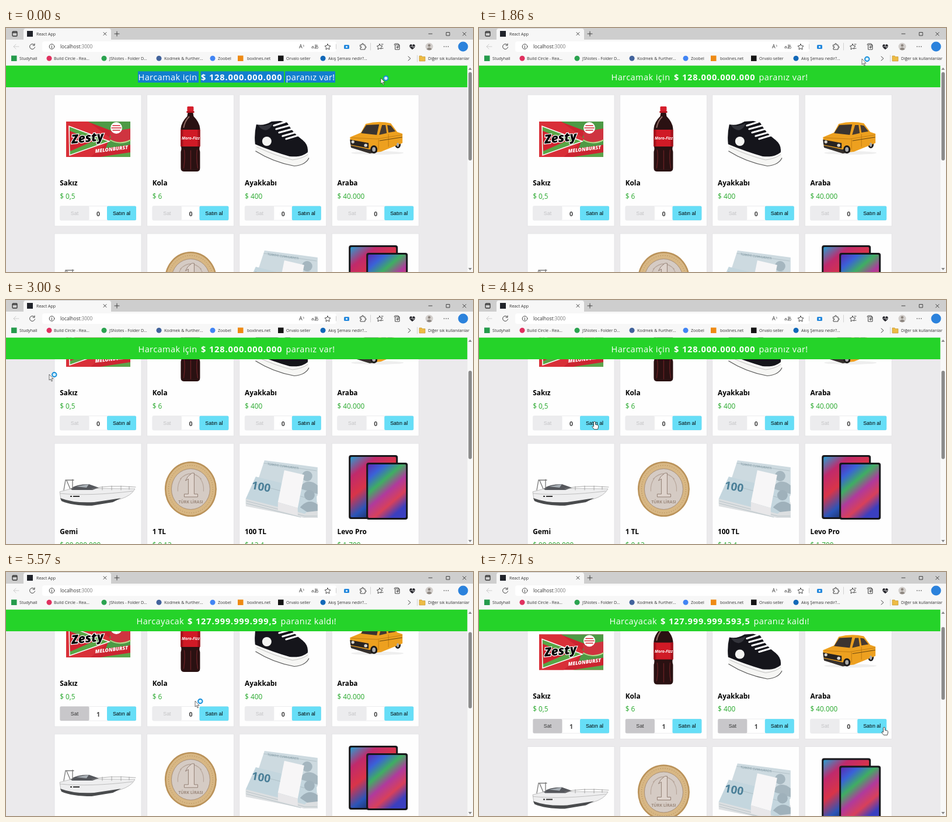
These frames come from a looping animation (800 px wide and 420 px high, 8000 ms). An HTML page:

```html
<!DOCTYPE html>
<html lang="tr">
<head>
<meta charset="utf-8">
<title>React App</title>
<style>
html, body { margin: 0; width: 100%; height: 100%; overflow: hidden; background: #ebeaec }
svg { display: block; font-family: "Open Sans", "Noto Sans", sans-serif }
.btn { font: 8.9px "Liberation Sans", Arial, sans-serif; text-anchor: middle }
.name { font-size: 11.8px; font-weight: 700 }
.price { font-size: 11.8px; fill: #27a82c }
.count { font-size: 10.5px; font-weight: 700; fill: #444; text-anchor: middle }
.head { font-size: 14.5px; fill: #fff; letter-spacing: .43px }
.sum { font-weight: 700; letter-spacing: .92px }
.small { font-size: 7.1px; fill: #333 }
.icon { fill: none; stroke: #333; stroke-width: .9; stroke-linejoin: round; stroke-linecap: round }
</style>
</head>
<body>
<svg id="stage" width="800" height="420" viewBox="0 0 800 420"></svg>
<script>
const rect = (x, y, w, h, fill, more = '') => `<rect x="${x}" y="${y}" width="${w}" height="${h}" fill="${fill}" ${more}/>`;
const path = (d, fill = 'none', more = '') => `<path d="${d}" fill="${fill}" ${more}/>`;
const oval = (x, y, rx, ry, fill, more = '') => `<ellipse cx="${x}" cy="${y}" rx="${rx}" ry="${ry}" fill="${fill}" ${more}/>`;
const dot = (x, y, r, fill, more) => oval(x, y, r, r, fill, more);
const text = (x, y, s, cls = '', more = '') => `<text x="${x}" y="${y}" class="${cls}" ${more}>${s}</text>`;
const line = (d, color, w = 1) => path(d, 'none', `stroke="${color}" stroke-width="${w}" stroke-linecap="round"`);
const blend = (id, ...colors) => `<linearGradient id="${id}" x2=".6" y2="1">`
  + colors.map((c, i) => `<stop offset="${i / (colors.length - 1)}" stop-color="${c}"/>`).join('') + '</linearGradient>';

// product pictures, in card coordinates
const gum = rect(20, 46, 110, 61, '#cc2430')
  + path('M56 46H130V86L88 92L98 62Z', '#4d9a45') + path('M20 46H58L98 76L62 107H20Z', '#d92f38')
  + path('M95 64L130 58V78Q112 86 97 77Z', '#cf3440') + line('M96 78Q112 87 130 78', '#b8d98c', 2)
  + path('M25 54L94 80L26 104Z', '#58a646', 'stroke="#fff" stroke-width="1.5"')
  + path('M26 62L68 79L27 97Z', '#d3222f')
  + dot(106, 57, 10, '#fff') + line('M100 53H112M98 57H114M100 61H112', '#d3222f', 1.6)
  + text(30, 84, 'Zesty', '', 'font-size="21" font-weight="800" font-style="italic" stroke="#fff" stroke-width="2.4" paint-order="stroke" transform="rotate(-6 30 84)"')
  + text(70, 100, 'MELONBURST', '', 'font-size="8.6" font-weight="800" font-style="italic" fill="#fff" transform="rotate(-7 70 100)"')
  + path('M78 107L130 99V107Z', '#5da44b');

const cola = rect(69, 20, 11, 8, '#d51f2b', 'rx="1.5"') + rect(68, 28, 13, 3, '#b5141f')
  + path('M70 31H79L80 37Q90 47 91 58V88Q89 92 91 98V126Q91 132 85 132H64Q58 132 58 126V98Q60 92 58 88V58Q59 47 69 37Z', '#2a1112')
  + line('M63 56Q65 45 72 38', '#8f6a64', 2) + rect(58, 60, 33, 29, '#d01a26')
  + rect(58, 60, 4, 29, '#a5111b') + rect(87, 60, 4, 29, '#a5111b')
  + text(75, 77, 'Moro-Fizz', '', 'font-size="6.8" font-weight="700" font-style="italic" fill="#fff" text-anchor="middle"')
  + line('M64 95Q66 108 63 126M75 96V128M86 95Q84 108 87 126', '#642024', 1.4);

const shoe = path('M27 84Q58 99 85 107Q106 106 118 98L119 109Q113 122 94 123Q58 116 28 97Z', '#f6f6f4')
  + line('M28 97Q58 116 94 122.500Q113 121 119 109', '#555', 1.2)
  + path('M29 51Q42 54 55 46L70 45L82 48Q91 65 106 76Q119 85 117 99Q106 108 86 106Q58 98 27 85Q25 68 29 51Z', '#15151b')
  + path('M32 52Q42 56 57 49Q54 59 45 61Q36 60 32 52Z', '#33343b') + dot(47, 80, 8, '#f4f4f2')
  + line('M59 53L78 47M63 59L85 53M68 65L90 59M74 71L95 65M80 76L100 70', '#fff', 3)
  + line('M30 90Q62 105 91 112Q108 110 117 103', '#aaa', .7);

const car = oval(78, 100, 45, 3, '#eee') + oval(113, 85, 5, 7, '#1c1a1a')
  + path('M31 73L50 65L58 50Q80 44 101 49L112 64L121 67L121 83L84 98L64 100L33 90Z', '#eda01f')
  + path('M50 66L59 52L81 51L77 69Z', '#3b3430') + path('M81 69L86 52H92L94 66ZM97 65L95 52L101 53L109 63Z', '#463a31')
  + path('M31 77L63 83L63 92L32 86Z', '#282321') + path('M32 87L64 94L78 93L77 99L65 101L33 91Z', '#35302d')
  + dot(36, 81, 2.6, '#d9d6ce') + dot(58, 87, 2.8, '#d9d6ce')
  + oval(72, 94, 6, 7, '#1c1a1a') + oval(72, 94, 3, 4, '#aaa') + oval(113, 86, 2, 3.5, '#aaa')
  + line('M34 74L77 76L120 69M80 77V94M97 68V89', '#b87410', .8) + line('M82 79L120 73', '#6b4810', 1.2);

const boat = path('M9 83L32 77L138 78Q132 90 112 96L65 104Q30 105 11 96Z', '#eeeeef', 'stroke="#999" stroke-width=".6"')
  + path('M10 94Q34 103 68 101L114 94L100 101L64 107Q30 107 12 99Z', '#494b4d')
  + path('M28 78Q36 70 59 70L76 76L65 80H30Z', '#55575c') + path('M37 74L59 70L55 76Z', '#a7aeb4')
  + line('M16 80L19 63H33M21 64L27 78M31 62V78', '#777', 1.3)
  + line('M64 78Q90 71 139 75M82 74V80M98 73V80M114 73V80M128 74V79', '#888', .7)
  + line('M10 86Q60 91 134 82', '#aaa', .7) + path('M27 90H30V92H27ZM32 90H43V92H32Z', '#333');

const coin = oval(75, 78.5, 44.5, 47.5, '#ba9259') + oval(75, 78.5, 42, 45, '#d8b784')
  + oval(75, 78.5, 38, 41, 'none', 'stroke="#a27d47" stroke-dasharray="1 3"') + oval(75, 78.5, 33, 35, '#d5cbc4', 'stroke="#a99078"')
  + line('M57 61Q75 43 93 61M53 82Q52 69 59 60M97 82Q98 69 91 60', '#b7a69b', 1.2)
  + path('M70 57L77 51H81V87H87V92H64V87H71V61L66 64Z', '#ded3cc', 'stroke="#8c786d" stroke-width=".9"')
  + text(75, 103, 'TÜRK LİRASI', '', 'font-size="7" font-weight="700" fill="#9b887b" text-anchor="middle"');

const cash = path('M43 29L134 41V89L122 105L27 78Z', '#cddae0') + path('M27 66L122 91V105L27 80Z', '#b4c1c8')
  + path('M11 95L28 57L132 83L134 128H112L11 104Z', '#c4d6de') + path('M11 95L112 121L134 101V128H112L11 108Z', '#dcdfe1')
  + line('M12 99L112 125H133M12 103L105 127M28 70L120 95M42 34L132 47', '#9fb0b8', .6)
  + dot(116, 56, 9, '#a5b6bf') + path('M102 77Q116 57 134 72V87Z', '#a5b6bf')
  + dot(120, 89, 9, '#9fb1bb') + path('M104 110Q118 93 134 105V116L116 118Z', '#9fb1bb')
  + text(20, 78, '100', '', 'font-size="19" font-weight="700" fill="#4a7f98" transform="rotate(10 20 78)"')
  + text(48, 37, 'TÜRKİYE CUMHURİYETİ', '', 'font-size="5" fill="#6d8793" transform="rotate(8 48 37)"')
  + path('M77 46L111 54L100 111L66 101Z', '#f7f6f7') + path('M66 101L100 111V124L66 115Z', '#e8e7e9');

const screen = (x, y, w, h, paint) => rect(x, y, w, h, '#17171b', 'rx="4"') + rect(x + 3, y + 3, w - 6, h - 6, `url(#${paint})`, 'rx="2"');
const tablet = screen(29, 20, 84, 110, 'warm') + screen(59, 33, 71, 98, 'cool');

const items = [
  ['Sakız', '0,5', gum], ['Kola', '6', cola], ['Ayakkabı', '400', shoe], ['Araba', '40.000', car],
  ['Gemi', '90.000.000', boat], ['1 TL', '0,13', coin], ['100 TL', '13,4', cash], ['Levo Pro', '1.700', tablet]
];
const cardX = i => 83 + i % 4 * 158.4;
const cardY = i => 115 + (i >> 2) * 239;
const card = ([name, price, art], i) => `<g transform="translate(${cardX(i)} ${cardY(i)})">`
  + rect(0, 0, 149, 226, '#fefefe', 'stroke="#e2e1e3" stroke-width=".8"') + art
  + text(9.3, 156, name, 'name') + text(9.3, 178.7, '$ ' + price, 'price')
  + rect(9.5, 191.5, 130, 24.5, '#fff', 'rx="2" stroke="#e8e8ea" stroke-width=".8"')
  + rect(9.5, 191.5, 50, 24.5, '#ececee', 'class="sell" rx="2"') + text(34.5, 206.7, 'Sat', 'btn sellText')
  + text(75, 208.5, '0', 'count')
  + rect(90, 191.5, 50, 24.5, '#66def7', 'rx="2"') + text(115, 206.7, 'Satın al', 'btn') + '</g>';

const links = [
  [9, 23, 'Studyhall', '#259b4c', 1], [69, 82, 'Build Circle - Rea...', '#e0315f'], [163, 177, 'JSNotes - Folder D...', '#2ba350'],
  [257, 271, 'Kodmek &amp; Further...', '#42639c'], [349, 363, 'Zoobel', '#4285f4'], [397, 413, 'boxlines.net', '#ee8a14', 1],
  [466, 480, 'Orvalo seller', '#151515', 1], [538, 552, 'Akış Şeması nedir?...', '#1268b8']
];
const link = ([x, tx, label, color, square]) =>
  (square ? rect(x, 47.5, 9.5, 9.5, color) : dot(x + 5, 52.3, 4.5, color)) + text(tx, 55, label, 'small');

const chrome = rect(0, 0, 800, 20, '#cecece') + path('M30 20V5Q30 1 34 1H176Q180 1 180 5V20H800V64.5H0V20Z', '#f7f7f7')
  + rect(62, 23, 504, 18, '#fff', 'rx="4"')
  + rect(36, 5, 10, 10, '#20232a') + text(52, 12.7, 'React App', 'small')
  + text(93, 35, 'localhost<tspan fill="#777">:3000</tspan>', 'small', 'style="font-size:8.2px"')
  + `<g class="icon">
    <path d="M11 7.5Q11 6 12.5 6H18Q19 6 19 7.500V13Q19 14 18 14H12.500Q11 14 11 13ZM11 8H19" stroke-width="1.300"/>
    <path d="M167 7.500L172 12.500M172 7.500L167 12.500M186 10H194M190 6V14M724 10H730M754.500 7.500H760V13H754.500ZM782.500 7.500L788 13M788 7.500L782.500 13"/>
    <path d="M22 32H13M17 28L13 32L17 36" stroke="#c8c8c8"/>
    <path d="M48.500 29A4.500 4.500 0 1 0 49.500 33M49 27V30H46"/>
    <circle cx="78.500" cy="32" r="4.300"/><path d="M78.500 31.500V34.500M78.500 29.800V30"/>
    <path d="M551 27.500L552.500 30.500L556 31L553.500 33.500L554 37L551 35.300L548 37L548.500 33.500L546 31L549.500 30.500Z"/>
    <path d="M607 29H610Q609 26.500 611 26.500T612 29H615V32Q617 31 617 33T615 34V37H607V34Q609 34.500 609 33T607 32Z"/>
    <path d="M640 27.500L641.500 30.500L645 31L642.500 33.500L643 36L640 35L637 37L637.500 33.500L635.500 31L638.500 30.500ZM643 28H646M644 35H646"/>
    <path d="M665 29Q665 27 667 27H671Q673 27 673 29V33M667 29H674V37H667ZM670.500 31V35M668.500 33H672.500"/>
    <path d="M689 49L693 52.500L689 56"/><path d="M624.500 26V38M704.500 47V58M565.500 28V36" stroke="#ccc"/>
  </g>`
  + text(502, 35, 'A', 'small', 'style="font-size:9px"') + line('M509 29Q511 30 510 32', '#555', .8)
  + text(523, 35, 'aあ', 'small', 'style="font:8px Open Sans,Noto Sans CJK JP,sans-serif"')
  + rect(579, 29, 9, 7, '#2388dd', 'rx="1.5"') + dot(583.5, 32.5, 1.5, '#fff')
  + path('M696 37Q690 33 691.5 29.500Q693.500 26.500 696 29.500Q698.500 26.500 700.500 29.500Q702 33 696 37Z', '#24242a')
  + line('M693 32H695L696 30L697.500 34L698 32H700', '#fff', .7)
  + dot(725, 32, 6.5, '#d2cecb') + dot(725, 30, 2.3, '#8e8781') + path('M720.500 36.500Q725 30.500 729.500 36.500Q725 40 720.500 36.500Z', '#8e8781')
  + dot(750.5, 32, .8, '#333') + dot(754, 32, .8, '#333') + dot(757.5, 32, .8, '#333')
  + dot(783, 32, 8.5, '#2b82dc')
  + links.map(link).join('')
  + path('M708 48H712L713.500 49.500H718V57H708Z', '#edbb45', 'stroke="#b98b24" stroke-width=".6"')
  + text(723, 55, 'Diğer sık kullanılanlar', 'small');

stage.innerHTML = '<defs>' + blend('warm', '#2a9ed0', '#c02a6c', '#d93448', '#2a55b8', '#1b2348')
  + blend('cool', '#5a2bb4', '#3a62d8', '#3fae62', '#b03a9c', '#d8405a', '#3a3fc0') + '</defs>'
  + rect(0, 64, 800, 356, '#ebeaec') + `<g id="page">${items.map(card).join('')}</g>`
  + rect(0, 64.5, 790.5, 37.5, '#25d329')
  + `<g id="mark">${rect(226, 74.5, 104, 19.5, '#127fce') + rect(333.5, 74.5, 142.5, 19.5, '#127fce') + rect(478, 74.5, 86, 19.5, '#127fce')}</g>`
  + '<g id="banner"></g>' + rect(790.5, 64.5, 9.5, 355.5, '#f8f8f8')
  + path('M792 72L795 68L798 72ZM792 413L795 417L798 413Z', '#888') + rect(792.2, 76, 5.8, 152, '#8b8b8b', 'id="thumb" rx="2.9"')
  + chrome
  + `<g id="arrow">${path('M0 0V10L2.300 8L4 12L5.500 11.300L3.900 7.500H7Z', '#fff', 'stroke="#333" stroke-width=".7"')
    + dot(8.8, .5, 3.7, '#d4effb', 'stroke="#168fda" stroke-width="2"')}</g>`
  + `<g id="hand">${path('M-1.500 0Q0 -1.800 1.500 0V4.300L5.800 5.300Q7 6 6.500 9L5.300 12.700H-.7L-4.300 8Q-3.800 6 -1.500 7.800Z', '#fff', 'stroke="#222" stroke-width=".8"')}</g>`;

const $ = (s, root = document) => root.querySelector(s);
const cards = [...page.children];
const costs = [.5, 6, 400];
const LOOP = 8000;

// The picture refreshes only on these sevenths of a second; idle ones are skipped.
const beats = [0, 1, 2, 3, 4, 6, 9, 10, 13, 14, 15, 16, 17, 18, 19, 20, 21, 25, 28, 29, 31, 32, 36, 39, 40, 43, 45, 47, 50, 51, 54];
// All motion is keyed by refresh count, so nothing moves through the pauses.
const moves = [[0, 642, 86], [4, 657, 122], [8, 656, 53], [14, 84, 125], [16, 74, 128], [18, 198, 210], [21, 198, 210],
  [22, 324, 222], [24, 324, 222], [25, 356, 260], [27, 356, 260], [28, 514, 264], [29, 514, 264], [30, 694, 268]];
const scrolls = [[14, 0], [15, 26], [16, 107], [22, 107], [23, 75], [24, 53.5]];
const buys = [20, 27, 30];

function at(keys, step, k = 1) {
  const i = keys.findIndex(key => key[0] > step);
  if (i < 0) return keys.at(-1)[k];
  if (!i) return keys[0][k];
  const a = keys[i - 1], b = keys[i];
  return a[k] + (b[k] - a[k]) * (step - a[0]) / (b[0] - a[0]);
}

function draw(t) {
  const step = beats.findLastIndex(b => b <= (t + 5) * .007);
  const x = at(moves, step, 1), y = at(moves, step, 2), scroll = at(scrolls, step);
  const bought = buys.filter(b => b <= step).length;
  page.setAttribute('transform', `translate(0 ${-scroll})`);

  cards.forEach((c, i) => {
    const own = i < bought;
    $('.sell', c).setAttribute('fill', own ? '#c8c7ca' : '#ececee');
    $('.sellText', c).setAttribute('fill', own ? '#333' : '#c3c3c5');
    $('.count', c).textContent = +own;
  });

  const left = 128e9 - costs.slice(0, bought).reduce((a, b) => a + b, 0);
  const sum = '$ ' + left.toLocaleString('de-DE');
  banner.innerHTML = bought
    ? text(223.5, 90, 'Harcayacak', 'head') + text(311, 90, sum, 'head sum') + text(470.5, 90, 'paranız kaldı!', 'head')
    : text(226.5, 90, 'Harcamak için', 'head') + text(334, 90, sum, 'head sum') + text(479.5, 90, 'paranız var!', 'head');
  mark.style.display = step < 2 ? '' : 'none';

  const size = bought ? 134 - 3 * bought : 152;
  thumb.setAttribute('y', 76 + scroll * size / 356);
  thumb.setAttribute('height', size);

  const over = cards.some((c, i) => {
    const dx = x - cardX(i), dy = y + scroll - cardY(i);
    return y > 102 && dx > 90 && dx < 140 && dy > 191 && dy < 216;
  });
  arrow.style.display = over ? 'none' : '';
  hand.style.display = over ? '' : 'none';
  (over ? hand : arrow).setAttribute('transform', `translate(${x} ${y})`);
}

const start = performance.now();
function frame() {
  draw((performance.now() - start) % LOOP);
  requestAnimationFrame(frame);
}
frame();
</script>
</body>
</html>
```
